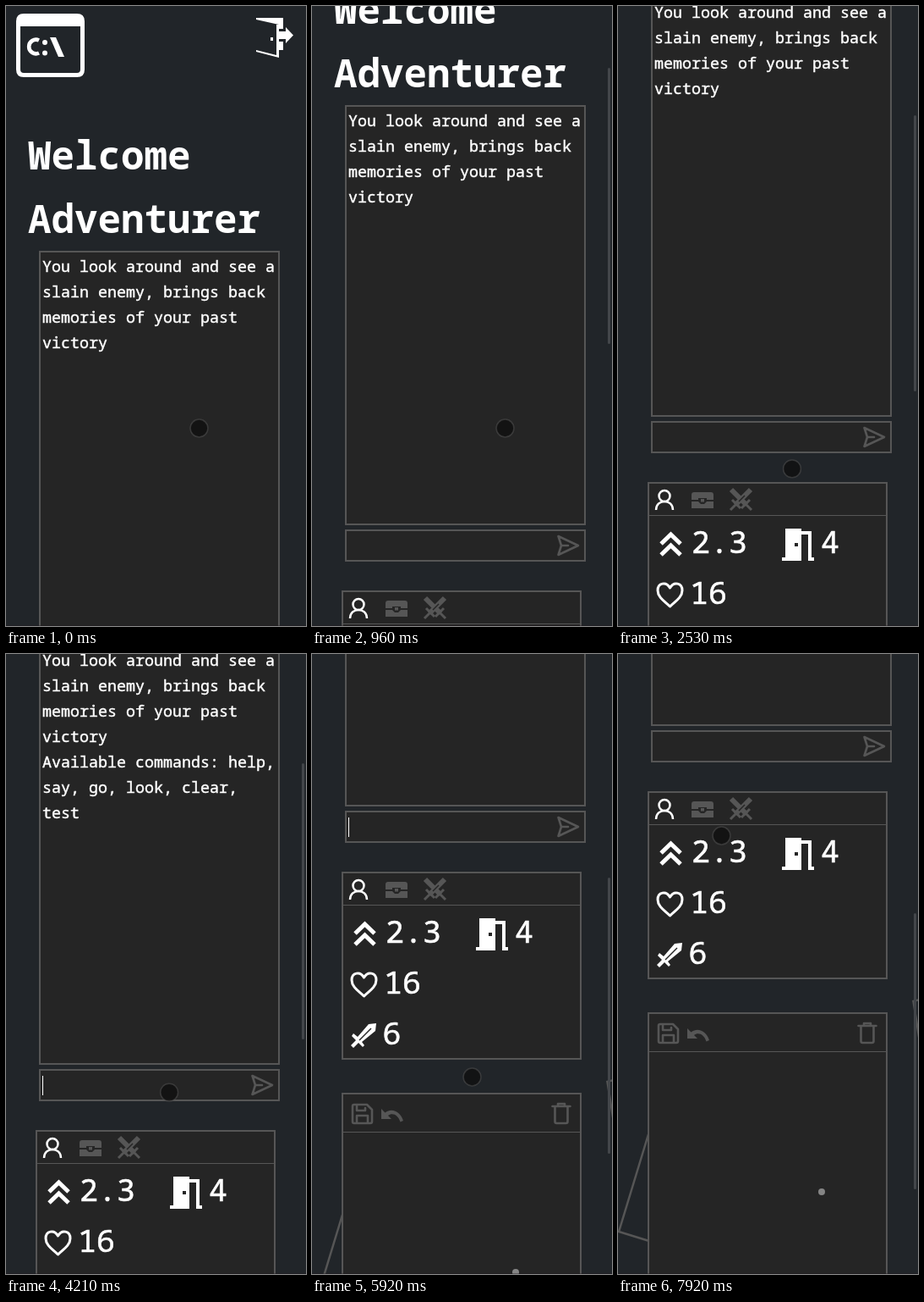
Animation of 355 by 732 pixels, one loop 8000 ms. Source, as an HTML page:

```html
<!DOCTYPE html>
<html lang="en">
<head>
<meta charset="utf-8">
<title>Welcome Adventurer</title>
<style>
  html, body { margin: 0; width: 100%; height: 100%; overflow: hidden; background: #212529; }
  svg { display: block; width: 355px; height: 732px; }
  text { font-family: "Noto Sans Mono", "DejaVu Sans Mono", monospace; fill: #fff; stroke: #fff; stroke-width: 0; white-space: pre; }
  .title { font-size: 45.83px; font-weight: 700; }
  .log { font-size: 18.33px; font-weight: 500; stroke-width: .45px; }
  .stat { font-size: 36.67px; stroke-width: .6px; }
  .panel { fill: #252525; stroke: #565656; stroke-width: 2; }
  .rule { stroke: #565656; stroke-width: 1; }
  .white { fill: #fff; }
  .gray { fill: #565656; }
  .line { fill: none; stroke: #fff; stroke-width: 3; stroke-linejoin: round; }
  .thin { stroke-width: 2.5; }
  .chevron { stroke-width: 5; stroke-linejoin: miter; }
  .dim { fill: none; stroke: #565656; stroke-width: 2.6; stroke-linejoin: round; stroke-linecap: round; }
</style>
</head>
<body>
<svg viewBox="0 0 355 732">
  <g id="page">
    <!-- header -->
    <path class="white" fill-rule="evenodd" d="M21 9H84Q93 9 93 18V75Q93 84 84 84H21Q12 84 12 75V18Q12 9 21 9ZM17 24V75Q17 79 21 79H84Q88 79 88 75V24Z"/>
    <path d="M39 40.5A8.3 8.3 0 1 0 39 55.5" fill="none" stroke="#fff" stroke-width="4.6"/>
    <circle class="white" cx="46" cy="43" r="3"/>
    <circle class="white" cx="46" cy="55.5" r="3"/>
    <path class="white" d="M52 37H59L69 60H62Z"/>
    <path class="white" d="M296 14H328V27H323V22L296 16ZM322 42H328V52H322ZM296 52L320 58V22L323 22V61L296 54ZM313 37H316V41H313ZM323 30H331V25L340 34.5L331 44V39H323Z"/>
    <text class="title" x="26" y="193">Welcome</text>
    <text class="title" x="26" y="268">Adventurer</text>

    <!-- backdrop outlines -->
    <g fill="none" stroke="#565656" stroke-width="2.5">
      <path d="M36 1267L1 1382L40 1394"/>
      <path d="M360 1107L349.5 1110L357 1158"/>
    </g>

    <!-- log and command line -->
    <rect class="panel" x="40" y="290" width="283" height="494"/>
    <g id="log"></g>
    <rect class="panel" x="40" y="791" width="283" height="36"/>
    <text class="log" id="typed" x="43" y="815"></text>
    <rect class="white" id="caret" x="43" y="798" width="1" height="23"/>
    <path class="dim" id="send" d="M291.5 798L315 809L291.5 820L295 809ZM295 809H303"/>

    <!-- stats -->
    <rect class="panel" x="36" y="863" width="282" height="220"/>
    <path class="rule" d="M36 901.5H318"/>
    <g class="line thin">
      <circle cx="55" cy="878.5" r="6.5"/>
      <path d="M45 895C45 881.5 65 881.5 65 895"/>
    </g>
    <path class="gray" d="M90 874H110Q113 874 113 877V883H105V881H95V883H87V877Q87 874 90 874ZM87 885H95L98 888H102L105 885H113V893H87ZM98 882H102V885.5H98Z"/>
    <g stroke="#565656" fill="none">
      <path stroke-width="6" d="M134 871L152 889M157 871L139 889"/>
      <path stroke-width="3" d="M146 893L156 883M145 893L135 883M150 887L158 895M141 887L133 895"/>
      <path stroke="#252525" stroke-width="1.5" d="M143 885L150 878"/>
    </g>
    <path class="line chevron" d="M51 935L62.5 924L74 935M51 948L62.5 937L74 948"/>
    <text class="stat" x="87" y="946">2.3</text>
    <path class="white" d="M198 917H217V920H229V951H232V955H225V924H217V955H194V951H198Z"/>
    <rect x="209" y="934" width="4" height="4" fill="#252525"/>
    <text class="stat" x="240" y="946">4</text>
    <path class="line" d="M61.5 1009C57 1004 47 999 47 990C47 981 57 979 61.5 987C66 979 76 981 76 990C76 999 66 1004 61.5 1009Z"/>
    <text class="stat" x="85" y="1006">16</text>
    <path class="white" d="M67 1042L76 1041L75 1050L59 1063L62 1067L60 1069L55 1064L49 1070L46 1067L52 1061L47 1056L49 1053L54 1057Z"/>
    <path d="M56 1061L70 1047" stroke="#252525" stroke-width="1.5"/>
    <text class="stat" x="83.5" y="1066">6</text>

    <!-- map -->
    <rect class="panel" x="36" y="1124" width="282" height="400"/>
    <path class="rule" d="M36 1169.5H318"/>
    <path class="dim" d="M48 1139Q48 1137 50 1137H65L71 1143V1157Q71 1159 69 1159H50Q48 1159 48 1157ZM53 1137V1144H63V1141M53 1159V1150H66V1159"/>
    <path class="gray" d="M82 1142L86.5 1146.5C95 1140 105 1146 108 1156L104.5 1157.5C102 1149 95 1146 90 1150L94 1154H82Z"/>
    <path class="dim" d="M284.5 1139H305.5M291 1138V1136H299V1138M287.5 1139V1157Q287.5 1159 289.5 1159H300.5Q302.5 1159 302.5 1157V1139"/>
    <circle cx="241" cy="1335" r="4" fill="#858585"/>
  </g>
  <rect id="thumb" x="350" width="3" height="326" rx="1.5" fill="#43464a"/>
  <rect y="731" width="355" height="1" fill="#1e181d" opacity=".4"/>
  <circle id="pointer" r="10.4" fill="rgba(14,14,14,.78)" stroke="rgba(82,82,82,.55)" stroke-width="1.5"/>
</svg>
<script>
const LOOP = 8000;
const NOTCH = 100, NOTCH_MS = 500;
const wheelTimes = [12, 640, 1213, 4200, 4728, 5190, 5848];
const keyTimes = [3300, 3420, 3540, 3660];
const command = "help", submitTime = 3890;
const caretOn = [[3230, 4420], [4950, 5430], [5900, 6430], [6960, 7310]];
// time, x, y
const pointerPath = [
  [0, 228.5, 498.5], [1700, 228.5, 498.5], [2430, 209, 549], [2530, 206, 546.5],
  [2930, 197, 525], [3230, 197, 525], [3750, 195, 520], [4620, 191.5, 515.5],
  [4920, 191.5, 515.5], [5920, 189.5, 499.5], [6420, 190, 488], [7320, 139, 316],
  [7920, 122.5, 214.5], [8000, 122.5, 214.5]
];
const story = ["You look around and see a", "slain enemy, brings back", "memories of your past", "victory"];
const reply = ["Available commands: help,", "say, go, look, clear,", "test"];

const $ = id => document.getElementById(id);
const page = $("page"), thumb = $("thumb"), pointer = $("pointer");
const typed = $("typed"), caret = $("caret"), send = $("send");
const show = (el, on) => el.setAttribute("visibility", on ? "visible" : "hidden");

const logLines = [...story, ...reply].map((line, i) => {
  const el = document.createElementNS("http://www.w3.org/2000/svg", "text");
  el.setAttribute("class", "log");
  el.setAttribute("x", 43);
  el.setAttribute("y", 314 + 30 * i);
  el.textContent = line;
  return $("log").appendChild(el);
});

const ease = p => (1 - Math.cos(Math.PI * Math.min(1, Math.max(0, p)))) / 2;
const scrollAt = t => wheelTimes.reduce((sum, start) => sum + NOTCH * ease((t - start) / NOTCH_MS), 0);

function pointerAt(t) {
  const i = pointerPath.findIndex(step => step[0] > t);
  const [t0, x0, y0] = pointerPath[i - 1], [t1, x1, y1] = pointerPath[i];
  const p = (t - t0) / (t1 - t0);
  return [x0 + (x1 - x0) * p, y0 + (y1 - y0) * p];
}

function render(t) {
  const scroll = Math.round(scrollAt(t));
  page.setAttribute("transform", `translate(0 ${-scroll})`);
  thumb.setAttribute("y", Math.round(scroll * 0.4413 - 3));
  show(thumb, scroll > 0);

  const count = t < submitTime ? keyTimes.filter(k => k <= t).length : 0;
  typed.textContent = command.slice(0, count);
  caret.setAttribute("x", 43 + 11 * count);
  show(caret, caretOn.some(([from, to]) => t >= from && t < to));
  send.style.stroke = count ? "#fff" : "";
  logLines.forEach((el, i) => show(el, i < story.length || t >= submitTime));

  const [x, y] = pointerAt(t);
  pointer.setAttribute("cx", x);
  pointer.setAttribute("cy", y);
}

const begin = performance.now();
function tick() {
  render((performance.now() - begin) % LOOP);
  requestAnimationFrame(tick);
}
tick();
</script>
</body>
</html>
```
